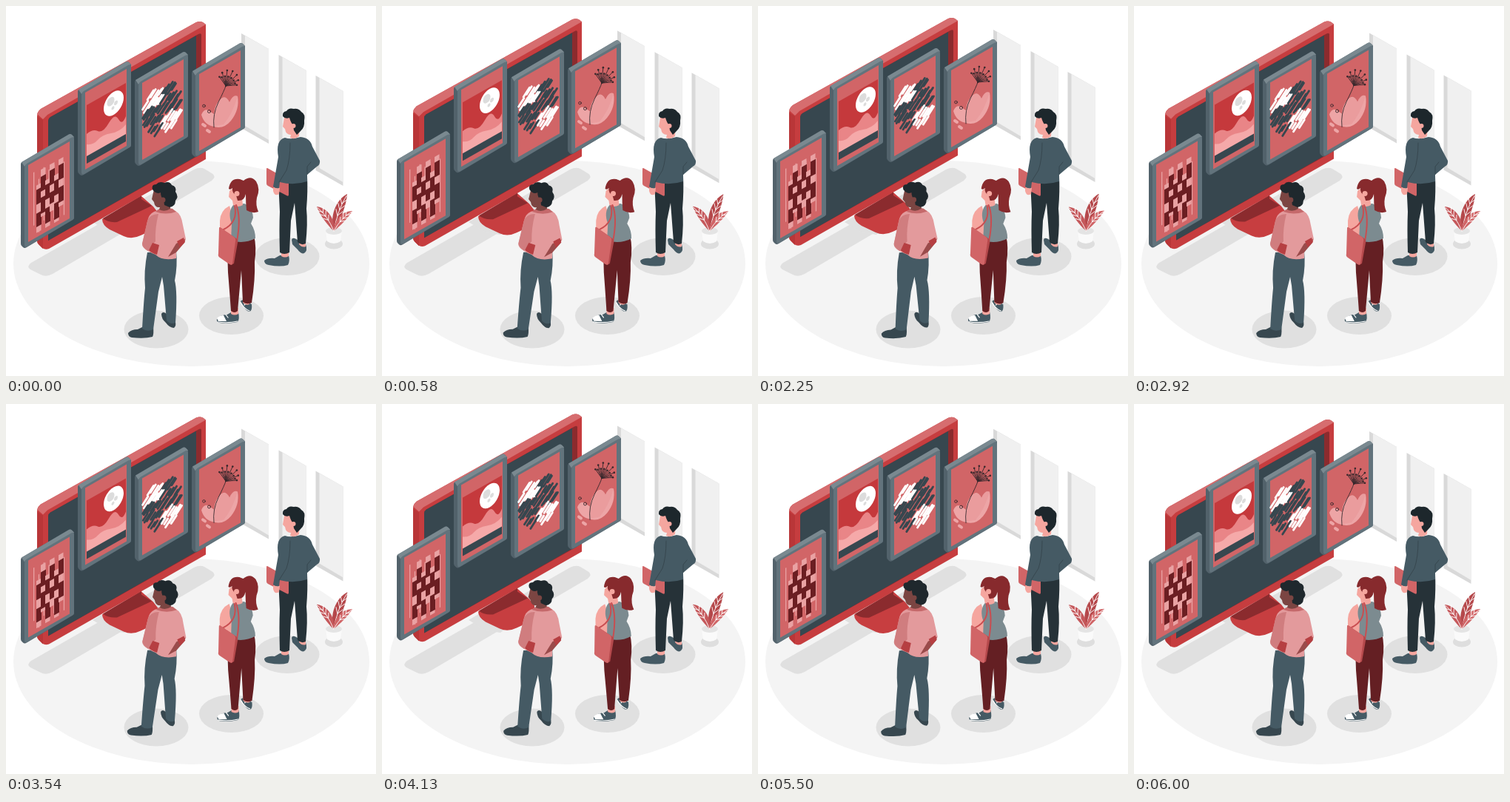
These frames come from a looping animation (500 by 500 pixels, 6.04 s). An HTML page:

```html
<!DOCTYPE html>
<html lang="en">
<head>
<meta charset="utf-8">
<title>Virtual gallery</title>
<style>
html, body { margin: 0; width: 100%; height: 100%; overflow: hidden; background: #fff; }
svg { display: block; width: 100%; height: 100%; }
.line { fill: none; stroke-linecap: round; stroke-linejoin: round; }
</style>
</head>
<body>
<svg viewBox="0 0 500 500">
  <defs>
    <g id="frame">
      <path fill="#52626b" d="M20 214Q20 211 23 210L84 174Q87 172 89 174L92 177V286Q92 288 90 289L28 326Q25 328 23 326L21 324Q20 323 20 321Z"/>
      <path fill="#7a8990" d="M21 211L84 174Q87 172 89 174L92 177 28 214 25 217Z"/>
      <path fill="#62737c" d="M25 218Q25 215 28 213L88 178Q92 176 92 180V286Q92 288 90 289L29 325Q25 327 25 323Z"/>
      <path fill="#d16567" d="M30 215L86 183V287L30 319Z"/>
    </g>
    <g id="panel">
      <path fill="#d9d9d9" d="M318 37L355 58V186L318 165Z"/>
      <path fill="#f0f0f0" d="M323 40L355 58V181L323 162Z"/>
    </g>
    <ellipse id="shade" rx="43.5" ry="25.5" fill="#e0e0e0"/>
  </defs>

  <ellipse cx="250.5" cy="348" rx="240.5" ry="139" fill="#f4f4f4"/>
  <path fill="#e0e0e0" d="M34 347L254 221Q262 217 268 220L278 226Q285 230 278 236L63 362Q54 367 47 363L33 356Q27 352 34 347Z"/>
  <path fill="#e0e0e0" d="M117 292L137 280 190 285 160 309 141 306Z"/>
  <use href="#shade" x="203" y="437"/>
  <use href="#shade" x="304.5" y="418.5"/>
  <use href="#shade" x="380" y="338.5"/>

  <g id="exhibit">
    <use href="#panel"/>
    <use href="#panel" x="50.5" y="29"/>
    <use href="#panel" x="100.5" y="57"/>

    <path fill="#c73e40" d="M130 288L183 257 199 271 206 280V299L182 310Q170 316 159 311L140 302Q130 296 130 288Z"/>
    <path fill="#8b2b2e" d="M131 287L183 256V261L197 270 150 292Q138 293 131 287Z"/>

    <path fill="#c63d3f" d="M42 149Q42 143 47 139L257 22Q262 20 266 22L270 25V207L58 328Q53 330 49 327L44 322Q42 320 42 317Z"/>
    <path fill="#d66d6f" d="M42 146Q43 142 47 139L257 22Q262 20 266 22L270 25 56 147 50 153Z"/>
    <path fill="#b93638" d="M42 149L50 154V328L44 322Q42 320 42 317Z"/>
    <path fill="#8b2b2e" d="M57 155Q57 152 60 150L260 38Q264 36 264 39V200L57 317Z"/>
    <path fill="#37474f" d="M57 155Q57 152 60 150L257 40V203L57 317Z"/>

    <use href="#frame"/>
    <g id="bars"></g>

    <use href="#frame" x="77" y="-98"/>
    <path fill="#c5393c" d="M109 134L162 104V180H109Z"/>
    <g transform="matrix(1 -.565 0 1.15 145.5 131.5)">
      <circle r="13.5" fill="#fff"/>
      <g fill="#dcdcdc"><circle cx="-4" cy="-4" r="5"/><circle cx="3" cy="1" r="2.5"/><circle cx="-1" cy="5" r="2"/></g>
    </g>
    <path fill="#e98587" d="M109 173Q117 166 124 169T139 158T152 153T162 149V174L109 204Z"/>
    <path fill="#f5a9a9" d="M109 187Q118 188 124 181T142 172T162 160V174L109 204Z"/>
    <path fill="#37474f" d="M109 203L162 173V183L109 213Z"/>

    <use href="#frame" x="154" y="-111"/>
    <g id="strokes" class="line" stroke-width="2.8"></g>

    <use href="#frame" x="231" y="-123"/>
    <path fill="#eda5a6" d="M264 147Q268 137 275 142L281 146Q282 132 291 125 297 120 302 130 307 119 313 122 316 140 304 155 294 167 281 163 268 161 264 147Z"/>
    <path fill="#e28b8d" d="M282 162Q280 137 291 126 297 120 302 130 307 119 313 122 306 146 294 160Z" opacity=".35"/>
    <path class="line" stroke="#eda5a6" stroke-width="4" d="M266 160l3 2M272 168l3 2"/>
    <g class="line" stroke="#37282c" stroke-width=".9">
      <path d="M281 164Q279 146 287 130T297 108"/>
      <g id="umbel"></g>
      <circle cx="267.5" cy="135" r="1.8"/><circle cx="274.5" cy="142.5" r="2"/>
    </g>
  </g>

  <g id="visitorRight">
    <path fill="#455a64" d="M386 316Q387 312 392 315L405 322Q408 331 403 334 399 336 394 329L387 322Z"/>
    <path fill="#455a64" d="M349 344Q354 340 363 341L370 337H382Q384 345 381 350 371 353 355 350 349 349 349 344Z"/>
    <path fill="#f5a69f" d="M372 330h10v8q-5 3-10 0ZM396 318h9v7q-5 2-9-3Z"/>
    <path fill="#263238" d="M368 236L407 230Q408 250 406 274 408 294 405 321 399 324 394 319L390 266 385 290 383 333Q376 337 370 333 369 300 370 278Z"/>
    <path fill="#d16567" d="M352 220Q352 218 355 220L380 234Q382 235 382 238V255Q382 258 379 256L354 243Q352 242 352 240Z"/>
    <path fill="#f5a69f" d="M361 246Q364 242 370 246L369 254Q363 258 361 250Z"/>
    <path fill="#455a64" d="M377 178Q385 181 398 177 411 178 414 190L424 209Q425 214 420 217L407 228V237Q389 243 370 238L369 246Q364 247 361 244L368 204Q364 181 377 178Z"/>
    <path class="line" stroke="#37474f" d="M384 185Q384 207 379 222L369 238M412 211L407 217V227"/>
    <path fill="#f5a69f" d="M376 151Q376 146 383 147L397 155 396 176Q390 181 384 178L385 174Q378 174 377 166L374 163Z"/>
    <path fill="#1d272c" d="M374 149Q373 143 379 142 382 137 389 139 395 138 399 143 405 146 403 155 404 164 398 169L393 174 389 168 388 161Q385 158 383 151 377 153 374 149Z"/>
    <circle cx="388.5" cy="162" r="3" fill="#f5a69f"/>
  </g>

  <g id="visitorMiddle">
    <path fill="#455a64" d="M317 399Q320 395 325 400L332 403Q333 412 329 413 325 413 321 406Z"/>
    <path fill="#455a64" d="M285 423Q290 417 299 417L304 414H314Q316 423 313 427 299 430 288 428 284 427 285 423Z"/>
    <path fill="#fff" d="M285 422Q289 418 294 418L298 426H287Z"/>
    <path class="line" stroke="#fff" stroke-width="1.2" d="M286 427Q300 429 313 426M297 417l3 4M317 401Q323 410 329 412M325 401l-3 3"/>
    <path fill="#f5a69f" d="M304 408h10v8q-5 3-10 0ZM320 396h9v7q-5 2-9-2Z"/>
    <path fill="#641f23" d="M306 312L335 310Q339 326 336 346 337 369 332 401 326 404 320 400L318 357 313 412Q309 416 304 412 302 384 300 360 298 333 306 312Z"/>
    <path fill="#f5a69f" d="M302 270Q290 276 289 290L289 299Q291 304 297 304L304 312 308 290Z"/>
    <path fill="#7c8b90" d="M307 269L322 267Q333 271 334 286L331 294Q337 303 337 314 322 322 304 317L305 294Q299 279 307 269Z"/>
    <path fill="#f5a69f" d="M302 250Q309 242 318 249L320 269Q313 273 307 269L306 263 301 258Z"/>
    <path fill="#872a2d" d="M301 247Q303 232 316 234L321 236Q331 228 338 237 344 247 339 259 337 269 341 278 333 281 325 276 324 266 324 254 322 264 313 263L311 256Q305 252 306 246 303 249 301 247Z"/>
    <circle cx="312" cy="253.5" r="3.5" fill="#f5a69f"/>
    <path class="line" stroke="#c94d50" stroke-width="2" d="M311 269Q318 285 312 318M309 270Q314 292 294 302"/>
    <path fill="#b5494c" d="M289 299L311 314Q314 316 313 320L308 348 304 350 288 337Z"/>
    <path fill="#d16567" d="M288 300Q288 298 291 300L308 312Q311 314 310 318L306 348Q306 351 302 349L289 340Q286 338 287 335Z"/>
  </g>

  <g id="visitorLeft">
    <path fill="#37474f" d="M210 416Q212 412 217 416L228 424Q231 432 227 435 221 435 216 428 210 423 210 416Z"/>
    <path fill="#37474f" d="M165 442Q169 437 178 437L186 433 199 434Q200 443 198 447 187 450 170 448 165 447 165 442Z"/>
    <path fill="#455a64" d="M191 333L230 331Q232 351 228 371 232 386 229 428 222 431 217 425L213 378 211 366 206 386 199 437Q191 441 184 436 186 400 188 381 186 358 191 333Z"/>
    <path fill="#e39a9c" d="M200 278Q213 272 229 277 237 281 239 296L243 315Q242 319 237 321L230 330V341Q211 345 202 336 184 329 184 322L191 291Q193 281 200 278Z"/>
    <path fill="#d07d7f" d="M206 281Q201 301 202 318L192 331Q184 326 184 321L191 291Q194 281 206 281Z"/>
    <path fill="#9a4b4b" d="M219 339L230 321 242 315 241 320 230 333Z"/>
    <path fill="#b63f42" d="M198 320L207 323 204 336Q197 334 193 330ZM231 318L240 313 242 319 235 326Z"/>
    <path fill="#c5696b" d="M202 278Q209 270 225 274L230 278Q216 283 202 278Z"/>
    <path fill="#7b4542" d="M200 248L222 246 222 274Q214 279 207 275L208 272Q201 273 200 265L197 261Z"/>
    <path fill="#1f282d" d="M198 248Q196 241 203 241 207 236 214 239 221 236 224 242 231 244 229 251 234 258 229 263 229 271 221 272L214 269 213 261Q209 259 209 252 203 255 198 248Z"/>
    <circle cx="212" cy="262" r="3.5" fill="#7b4542"/>
  </g>

  <ellipse cx="443" cy="321.5" rx="12" ry="7" fill="#dedede"/>
  <path fill="#fafafa" d="M432 304H454L452 318Q443 324 434 318Z"/>
  <ellipse cx="443" cy="304" rx="11" ry="5" fill="#e4e4e4"/>
  <g id="plant"></g>
</svg>
<script>
const $ = id => document.getElementById(id);
const LOOP = 6040;
const SLOPE = 0.565;

// Repeatable pseudo-random number in 0..1.
const noise = n => {
  const v = Math.sin(n * 12.9898) * 43758.5453;
  return v - Math.floor(v);
};
const repeat = (count, make) => Array.from({ length: count }, (_, i) => make(i)).join('');

// Upright bar in the isometric plane of the pictures.
function bar(fill, x, y, w, h) {
  return `<path fill="${fill}" d="M${x} ${y}l${w} ${-SLOPE * w}v${h}l${-w} ${SLOPE * w}z"/>`;
}

function drawBars() {
  const top = x => 225 - SLOPE * (x - 37);
  const pale = '#e9a2a3', deep = '#6b1e22';
  return repeat(7, i => {
    const x = 37 + i * 6.8;
    return bar(pale, x, top(x) + 14 * noise(i), 1.3, 72);
  }) + repeat(6, i => {
    const x = 41 + i * 6;
    const y = top(x) + (i % 2 ? 8 : 26);
    return bar(pale, x, y - 6, 6.5, 64) + bar(deep, x, y + 4 * noise(i), 7, 20) +
      bar(deep, x, y + 32, 7, 14 + 8 * noise(i + 9));
  });
}

// Slanted brush marks fill a disc: an ink band across it, opposite quarters alike.
function drawStrokes() {
  const rows = 5, columns = 14;
  return repeat(rows * columns, n => {
    const row = Math.floor(n / columns), column = n % columns;
    const dx = (column - 6.5) * 3.5, dy = (row - 2) * 12;
    if (Math.hypot(dx, dy) > 29) return '';
    const isInk = row === 2 || (dx > 0) === (row < 2);
    const length = 8 + 13 * noise(n + 1);
    const x = 211 + dx - length * .27;
    const y = 140 + dy - .3 * dx + length * .42 + 6 * noise(n + 40) - 3;
    return `<path stroke="${isInk ? '#37474f' : '#fff'}" d="M${x} ${y}l${length * .54} ${-length * .84}"/>`;
  });
}

// Flower head: thin rays that end in dots.
function drawUmbel() {
  return repeat(13, i => {
    const angle = (-125 + i * 10) * Math.PI / 180;
    const reach = i % 2 ? 13 : 15 + 7 * Math.sin(i * Math.PI / 12);
    const x = 297 + reach * Math.cos(angle), y = 108 + reach * Math.sin(angle);
    return `<path d="M297 108L${x} ${y}"/><path stroke-width="2.6" d="M${x} ${y}h0"/>`;
  });
}

// Leaf from the pot to its tip, widened to both sides, with a pale rib and side veins.
function leaf(fill, tipX, tipY, width, bend) {
  const baseX = 443, baseY = 304;
  const dx = tipX - baseX, dy = tipY - baseY, size = Math.hypot(dx, dy);
  const at = (along, side) =>
    `${baseX + dx * along - dy / size * side} ${baseY + dy * along + dx / size * side}`;
  const veins = repeat(3, i => {
    const along = .4 + i * .16;
    return `M${at(along, bend * .6)}L${at(along + .14, bend * .6 + width * .6)}` +
      `M${at(along, bend * .6)}L${at(along + .14, bend * .6 - width * .6)}`;
  });
  return `<path fill="${fill}" d="M${at(0, 0)}C${at(.3, bend + width)} ${at(.75, bend + width)} ${at(1, 0)}` +
    `C${at(.75, bend - width)} ${at(.3, bend - width)} ${at(0, 0)}"/>` +
    `<path class="line" stroke="#fff" stroke-width=".9" d="M${at(0, 0)}Q${at(.55, bend * 1.2)} ${at(.95, 0)}${veins}"/>`;
}

$('bars').innerHTML = drawBars();
$('strokes').innerHTML = drawStrokes();
$('umbel').innerHTML = drawUmbel();
$('plant').innerHTML = leaf('#b5484b', 461, 254, 8, -4) +
  leaf('#d06466', 468, 277, 6, -4) + leaf('#c5585b', 420, 271, 7, 4);

// Linear bob: 0 → 1 → 0 over one cycle.
const bob = p => 1 - Math.abs(1 - 2 * p);
// Linear sway: 0 → 1 → -1 → 0 over one cycle.
const sway = p => p < .25 ? 4 * p : p < .75 ? 2 - 4 * p : 4 * p - 4;
const phase = (t, period) => t % period / period;

function rotate(id, degrees, x, y) {
  $(id).setAttribute('transform', `rotate(${degrees} ${x} ${y})`);
}

function draw(now) {
  const t = now % LOOP;
  $('exhibit').setAttribute('transform', `translate(0 ${-10 * bob(phase(t, 3000))})`);
  rotate('visitorLeft', sway(phase(t, 3000)), 204, 343);
  rotate('visitorMiddle', sway(phase(t, 6000)), 313, 330);
  rotate('plant', sway(phase(t, 3000)), 444, 279);
}

let start;
function tick(now) {
  start ??= now;
  draw(now - start);
  requestAnimationFrame(tick);
}
draw(0);
requestAnimationFrame(tick);
</script>
</body>
</html>
```
